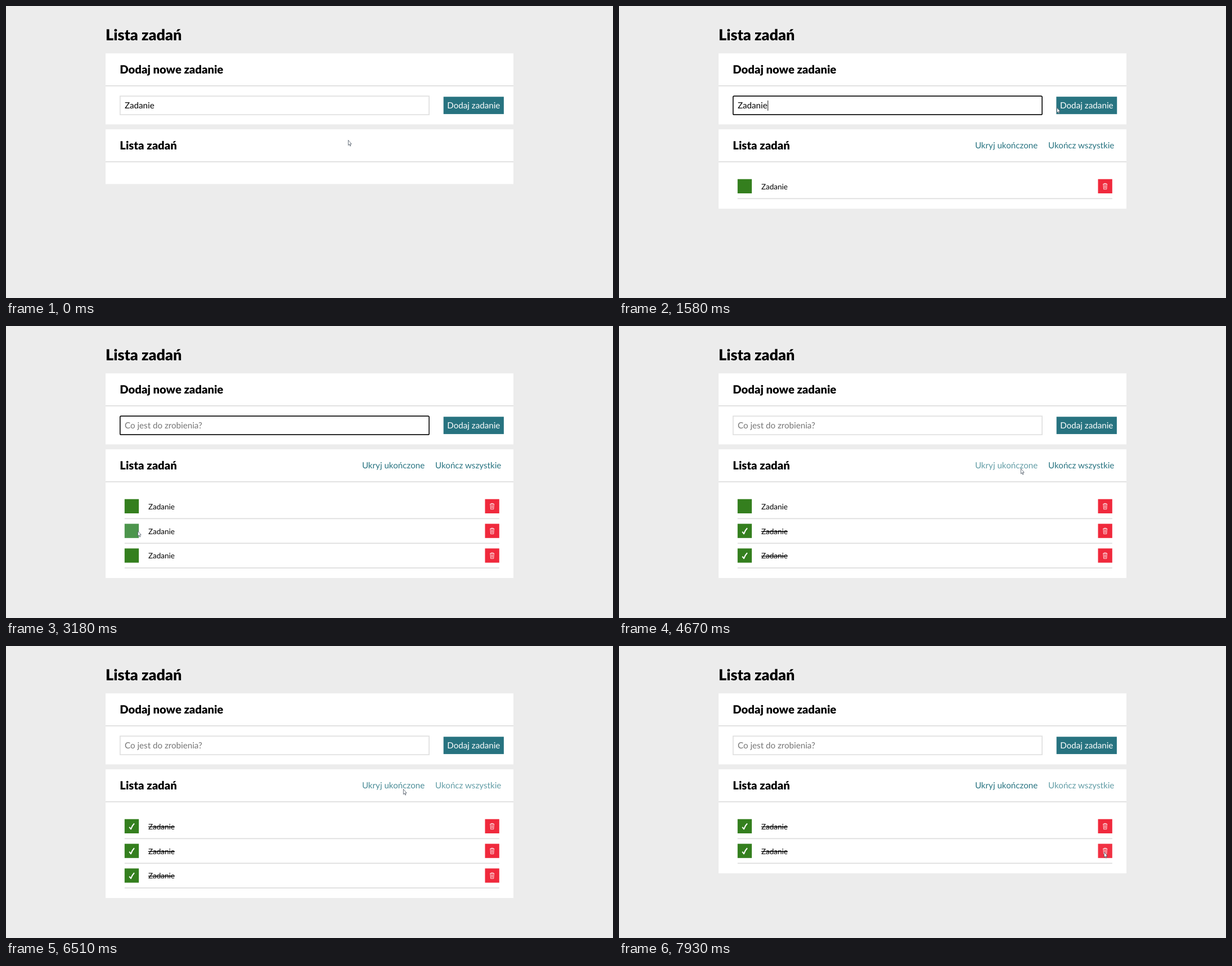
Recreate the animation shown at these times as an HTML page. Size 1079 px wide and 519 px high, loop 8 s.

```html
<!DOCTYPE html>
<html lang="pl">
<head>
<meta charset="utf-8">
<title>Lista zadań</title>
<style>
  html, body { margin: 0; width: 100%; height: 100%; overflow: hidden; background: #ececec; }
  svg { display: block; width: 1079px; height: 519px; font: 15.17px Lato, sans-serif; text-rendering: geometricPrecision; }
  .h1 { font-size: 27px; font-weight: 900; }
  .h2 { font-size: 20.23px; font-weight: 900; }
  .task { font-size: 13.49px; }
  .done { text-decoration: line-through; }
</style>
</head>
<body>
<svg id="stage" viewBox="0 0 1079 519"></svg>
<script>
const LOOP = 8000, FADE = 250, STEP = 10;
const PITCH = 43.83, BOX = 25.3, LEFT = 210.8, RIGHT = 876.8;
const TEAL = '#277380', TEAL_LIGHT = '#4c939f', LINK_LIGHT = '#629da6';

// Each move eases the pointer from where it was to (x, y)
const moves = [
  { from: 0, to: 0, x: 608, y: 238 },
  { from: 100, to: 800, x: 833, y: 181 },
  { from: 950, to: 1180, x: 768, y: 180 },
  { from: 1500, to: 1826, x: 833, y: 181 },
  { from: 2660, to: 2940, x: 234, y: 364 },
  { from: 3430, to: 3650, x: 231, y: 407 },
  { from: 3860, to: 4500, x: 714, y: 253 },
  { from: 5560, to: 5860, x: 786, y: 252 },
  { from: 6220, to: 6510, x: 706, y: 254 },
  { from: 7330, to: 7700, x: 862, y: 366 }
];

// What the user does: time, action, task index
const script = [
  [870, 'add'], [1340, 'paste'], [1740, 'blur'], [1820, 'add'], [2220, 'paste'], [2550, 'blur'],
  [2630, 'add'], [3340, 'blur'], [3410, 'finish', 1], [3810, 'finish', 2], [4910, 'toggle'],
  [5480, 'toggle'], [5950, 'finishAll'], [6740, 'toggle'], [7220, 'toggle'], [7900, 'remove', 1]
];

const actions = {
  add(s) { s.tasks.push(false); s.value = ''; s.focused = true; },
  paste(s) { s.value = 'Zadanie'; },
  blur(s) { s.focused = false; },
  finish(s, i) { s.tasks[i] = true; },
  finishAll(s) { s.tasks.fill(true); },
  toggle(s) { s.hidden = !s.hidden; },
  remove(s, i) { s.tasks.splice(i, 1); }
};

function stateAt(t) {
  const s = { tasks: [], value: 'Zadanie', focused: false, hidden: false, edited: 0, redrawn: 0 };
  for (const [time, action, index] of script) {
    if (time > t) break;
    actions[action](s, index);
    if (action === 'add' || action === 'paste') s.edited = time;
    if (action !== 'paste' && action !== 'blur') s.redrawn = time;
  }
  return s;
}

function pointerAt(t) {
  let { x, y } = moves[0];
  for (const m of moves) {
    if (m.from >= t) break;
    const u = Math.min(1, (t - m.from) / (m.to - m.from || 1)), k = u * u * (3 - 2 * u);
    x += (m.x - x) * k;
    y += (m.y - y) * k;
  }
  return { x, y };
}

// Share of the last FADE ms that the pointer spent inside a box; a redraw starts it anew
function hover(t, x, y, w, h, since = 0) {
  let hits = 0;
  for (let age = 0; age < FADE && t - age >= since; age += STEP) {
    const p = pointerAt(t - age);
    if (p.x > x && p.x < x + w && p.y > y && p.y < y + h) hits++;
  }
  return hits * STEP / FADE;
}

const mix = (a, b, k) => '#' + [1, 3, 5].map(i => {
  const [from, to] = [a, b].map(c => parseInt(c.slice(i, i + 2), 16));
  return Math.round(from + (to - from) * k).toString(16).padStart(2, '0');
}).join('');
const rect = (x, y, w, h, fill, extra = '') =>
  `<rect x="${x}" y="${y}" width="${w}" height="${h}" fill="${fill}" ${extra}/>`;
const text = (x, y, str, cls = '', fill = '#000', anchor = 'start') =>
  `<text x="${x}" y="${y}" class="${cls}" fill="${fill}" text-anchor="${anchor}">${str}</text>`;
const line = (d, width) =>
  `<path d="${d}" fill="none" stroke="#fff" stroke-width="${width}" stroke-linejoin="round"/>`;

function panel(y, height, title) {
  return rect(177, y, 725, height, '#fff') + rect(177, y + 56.8, 725, 1.7, '#ddd') +
    text(202.3, y + 35.3, title, 'h2');
}

function inputField(t, { value, focused, edited }) {
  const caretOn = focused && (t - edited) % 1000 < 500;
  const border = focused ? 'stroke="#101010" rx="1.8"' : 'stroke="#e0e0e0"';
  return rect(202.8, 160.2, 549.3, 33, '#fff', border + ' stroke-width="1.7"') +
    text(211, 182.4, value || 'Co jest do zrobienia?', '', value ? '#000' : '#757575') +
    (caretOn ? rect(value ? 264.3 : 211, 168, 0.9, 18, '#000') : '');
}

function addButton(t) {
  const w = 107.2, h = 30.8, x = 831.3, y = 176.7;
  const k = hover(t, x - w / 2, y - h / 2, w, h);
  return `<g transform="translate(${x} ${y}) scale(${1 + 0.155 * k})">` +
    rect(-w / 2, -h / 2, w, h, mix(TEAL, TEAL_LIGHT, k)) +
    text(0, 5.6, 'Dodaj zadanie', '', '#fff', 'middle') + '</g>';
}

function link(t, right, width, label, disabled, since) {
  const k = disabled ? 1 : hover(t, right - width, 237, width, 22, since);
  return text(right, 253.2, label, '', mix(TEAL, LINK_LIGHT, k), 'end');
}

function taskRow(t, done, row, since) {
  const y = 307.7 + row * PITCH, trashX = RIGHT - BOX;
  const square = (x, color, light) =>
    rect(x, 0, BOX, BOX, mix(color, light, hover(t, x, y, BOX, BOX, since)));
  return `<g transform="translate(0 ${y})">` +
    square(LEFT, '#347f1e', '#4c954c') +
    (done ? line('M219.2 14.2L222 17.8Q224.2 11.5 228 7.8', 2) : '') +
    text(252.9, 18.1, 'Zadanie', done ? 'task done' : 'task') +
    square(trashX, '#f0293c', '#f65866') +
    `<g transform="translate(${trashX + BOX / 2} 13)">` +
    line('M-4 -4H4M-2 -4V-5.3H2V-4M-3.2 -4L-2.6 5H2.6L3.2 -4M-1 -2.5V3.5M1 -2.5V3.5', 0.8) + '</g>' +
    rect(LEFT, 33.8, RIGHT - LEFT, 1.7, '#ddd') + '</g>';
}

function render(t) {
  const state = stateAt(t), { tasks, hidden, redrawn } = state;
  const shown = hidden ? tasks.filter(done => !done) : tasks;
  const { x, y } = pointerAt(t);

  stage.innerHTML = rect(0, 0, 1079, 519, '#ececec') +
    text(177, 60.6, 'Lista zadań', 'h1') +
    panel(84.2, 126.2, 'Dodaj nowe zadanie') + inputField(t, state) + addButton(t) +
    panel(219.2, 97.2 + shown.length * PITCH, 'Lista zadań') +
    (tasks.length
      ? link(t, 744.2, 111, (hidden ? 'Pokaż' : 'Ukryj') + ' ukończone', false, redrawn) +
        link(t, 880.3, 117, 'Ukończ wszystkie', tasks.every(Boolean), redrawn)
      : '') +
    shown.map((done, row) => taskRow(t, done, row, redrawn)).join('') +
    `<path transform="translate(${x} ${y})" d="M.4 .4V9.6L2.3 7.8 3.7 11 5 10.4 3.6 7.3H6.2Z" fill="#fff" stroke="#4b5663" stroke-width=".8"/>`;
}

const stage = document.getElementById('stage');
function tick() {
  render(performance.now() % LOOP);
  requestAnimationFrame(tick);
}
tick();
</script>
</body>
</html>
```
